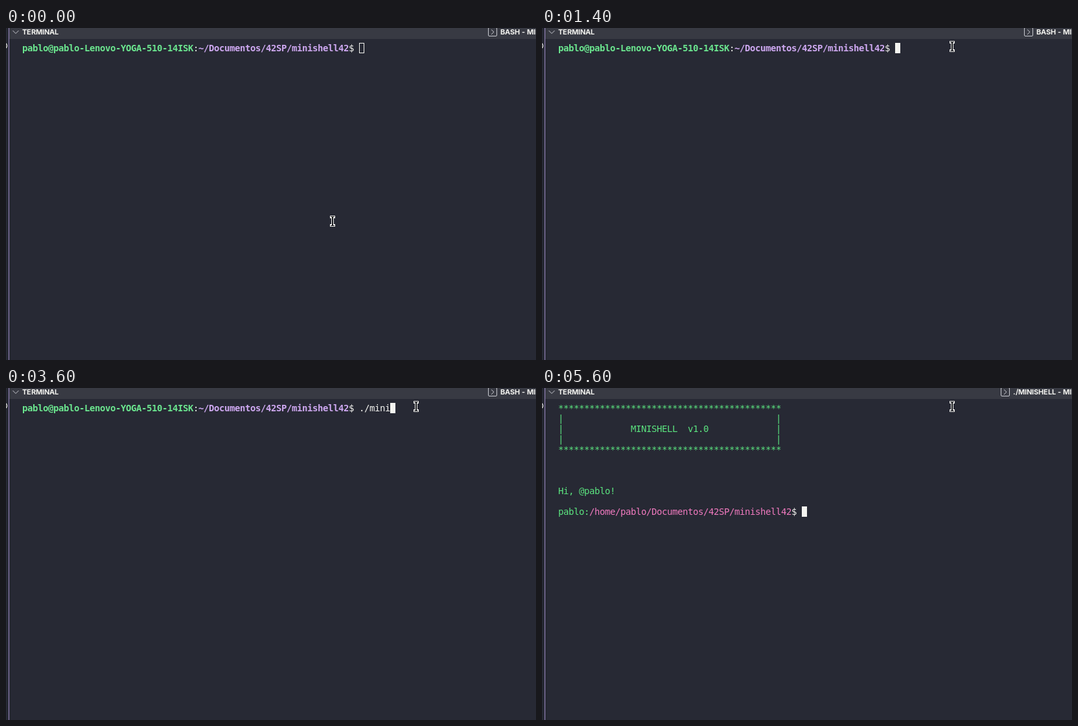
An HTML page with a canvas for the animation above (8000 ms loop, 818 px wide and 513 px high).

```html
<!DOCTYPE html>
<html lang="en">
<head>
<meta charset="utf-8">
<title>Terminal</title>
<style>
  html, body { margin: 0; width: 100%; height: 100%; overflow: hidden; background: #272934; }
  canvas { display: block; }
</style>
</head>
<body>
<canvas id="stage" width="818" height="513"></canvas>
<script>
const ctx = document.getElementById('stage').getContext('2d');
const LOOP = 8000, LEFT = 25, TOP = 23, CELL = 8, ROW = 16;
const MONO = '14px "DejaVu Sans Mono", monospace';
const UI = 'bold 11px Inter, sans-serif';
const COLOR = {
  back: '#272934', header: '#383a43', edge: '#9d8bc4', icon: '#c8cad0', white: '#f4f4f0',
  green: '#5be37f', boldGreen: '#6be68f', purple: '#cfa9f2', pink: '#f07abf'
};
const USER = 'pablo';
const FOLDER = 'Documentos/42SP/minishell42';

// [start time, value]
const mouseSteps = [
  [0, [504, 298]], [500, [562, 205]], [600, [645, 52]], [700, [640, 20]], [800, [642, 16]],
  [900, [637, 15]], [1200, [635, 20]], [1300, [633, 26]], [1400, [633, 28]]
];
const typedSteps = [
  [0, ''], [2400, '.'], [2500, './'], [3400, './m'], [3600, './mini'], [4600, './minishell ']
];
const FOCUS = 1400, ENTER = 5500, LAUNCH = 5600;

const valueAt = (steps, t) => steps.filter(([start]) => start <= t).pop()[1];

// Glyphs sit on whole pixels, each advance rounded.
function write(text, x, y, color, font) {
  ctx.font = font;
  ctx.fillStyle = color;
  for (const ch of text) {
    ctx.fillText(ch, x, y);
    x += Math.round(ctx.measureText(ch).width);
  }
  return x;
}

function term(row, runs) {
  let x = LEFT;
  for (const [text, color, bold] of runs) {
    x = write(text, x, TOP + row * ROW + 13, color, (bold ? 'bold ' : '') + MONO);
  }
}

function line(points, color, width = 1) {
  ctx.beginPath();
  points.forEach(([x, y]) => ctx.lineTo(x, y));
  ctx.strokeStyle = color;
  ctx.lineWidth = width;
  ctx.stroke();
}

function caret(col, row, filled) {
  const x = LEFT + col * CELL, y = TOP + row * ROW;
  ctx.fillStyle = ctx.strokeStyle = COLOR.white;
  ctx.lineWidth = 1;
  if (filled) ctx.fillRect(x, y, CELL, ROW);
  else ctx.strokeRect(x + .5, y + .5, CELL - 1, ROW - 1);
}

function frame(title, iconX) {
  ctx.fillStyle = COLOR.back;
  ctx.fillRect(0, 0, 818, 513);
  ctx.fillStyle = COLOR.header;
  ctx.fillRect(5, 0, 813, 17);
  ctx.fillStyle = COLOR.edge;
  ctx.fillRect(4, 0, 1, 513);

  ctx.beginPath();
  ctx.arc(-3, 27.5, 4.5, -1, 1);
  ctx.strokeStyle = COLOR.white;
  ctx.lineWidth = 1.2;
  ctx.stroke();

  line([[10.5, 4], [15, 8.5], [19.5, 4]], COLOR.icon);
  write('TERMINAL', 25, 10, COLOR.white, UI);

  ctx.beginPath();
  ctx.roundRect(iconX + .5, -.5, 13, 13, 1.5);
  ctx.strokeStyle = COLOR.icon;
  ctx.lineWidth = 1;
  ctx.stroke();
  line([[iconX + 5, 2.5], [iconX + 9, 6.2], [iconX + 5, 10]], COLOR.icon);
  write(title + ' - MINISHELL', iconX + 19, 10, COLOR.white, UI);
}

function pointer([x, y]) {
  ctx.fillStyle = COLOR.white;
  ctx.fillRect(x - 4, y - 8, 8, 4);
  ctx.fillRect(x - 4, y + 5, 8, 4);
  ctx.fillRect(x - 2, y - 7, 4, 15);
  ctx.fillStyle = '#111218';
  ctx.fillRect(x - 3, y - 7, 6, 1);
  ctx.fillRect(x - 3, y + 7, 6, 1);
  ctx.fillRect(x - 1, y - 7, 2, 15);
}

function bashScreen(t) {
  const typed = valueAt(typedSteps, t);
  frame('BASH', 744);
  term(0, [
    [`${USER}@${USER}-Lenovo-YOGA-510-14ISK`, COLOR.boldGreen, true],
    [':', COLOR.white],
    ['~/' + FOLDER, COLOR.purple, true],
    ['$ ' + typed, COLOR.white]
  ]);
  if (t < ENTER) caret(65 + typed.length, 0, t >= FOCUS);
  else caret(0, 1, true);
}

function shellScreen() {
  const stars = '*'.repeat(43);
  const side = '|' + ' '.repeat(41) + '|';
  const name = '|' + ' '.repeat(13) + 'MINISHELL  v1.0' + ' '.repeat(13) + '|';
  frame('./MINISHELL', 708);
  [stars, side, name, side, stars].forEach((text, row) => term(row, [[text, COLOR.green]]));
  term(8, [[`Hi, @${USER}!`, COLOR.green]]);
  term(10, [
    [USER + ':', COLOR.green],
    [`/home/${USER}/${FOLDER}`, COLOR.pink],
    ['$', COLOR.white]
  ]);
  caret(47, 10, true);
}

function draw() {
  const t = performance.now() % LOOP;
  if (t < LAUNCH) bashScreen(t);
  else shellScreen();
  pointer(valueAt(mouseSteps, t));
  requestAnimationFrame(draw);
}
draw();
</script>
</body>
</html>
```
